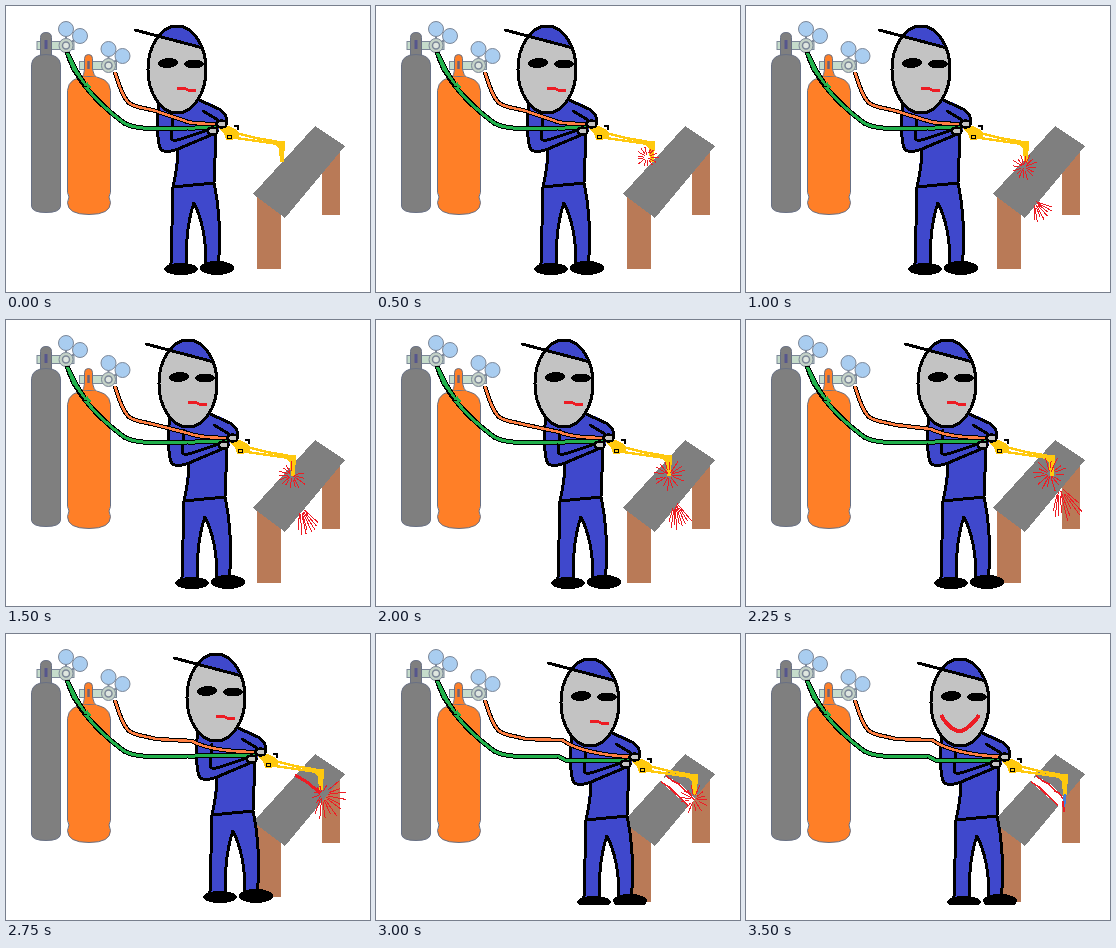
Animation of 364 by 286 pixels, one loop 4 s. Source, as an HTML page:

```html
<!DOCTYPE html>
<html lang="en">
<head>
<meta charset="utf-8">
<title>Gas cutting</title>
<style>
  html, body { margin: 0; width: 100%; height: 100%; overflow: hidden; background: #fff; }
  svg { display: block; width: 100vw; height: 100vh; }
  .ink { fill: none; stroke: #000; stroke-width: 3; stroke-linecap: round; stroke-linejoin: round; }
  .blue { fill: #3f48cc; }
  .skin { fill: #c3c3c3; stroke: #000; }
  .gold { fill: #ffc90e; }
  .steel { fill: #7f7f7f; }
  .wood { fill: #b97a57; }
  .red { fill: none; stroke: #ed1c24; }
  .hose { fill: none; stroke-linejoin: round; }
  .crisp { shape-rendering: crispEdges; }
</style>
</head>
<body>
<svg viewBox="0 0 364 286">
  <defs>
    <clipPath id="capClip"><path d="M125 15H205V44L197 42L129 24Z"/></clipPath>
    <clipPath id="floor"><path d="M0 0H364V271H0Z"/></clipPath>
    <g id="gauge" stroke="#7c8798">
      <rect x="-29" y="-4" width="37" height="8" fill="#c5dccb"/>
      <path d="M0 -7V-10M6 -4L10 -7" stroke-width="2"/>
      <circle cy="-16.5" r="7.5" fill="#a9cdf0"/>
      <circle cx="14" cy="-9.5" r="7.5" fill="#a9cdf0"/>
      <circle r="7" fill="#c5d3c8"/>
      <circle r="3.5" fill="#dfe6e0" stroke-width="1.500"/>
    </g>
  </defs>

  <use href="#gauge" x="60" y="39.500"/>
  <use href="#gauge" x="102.500" y="59.500"/>
  <g stroke="#687084" transform="translate(.5 .5)">
    <path class="steel" d="M34 51V31Q34 26 39.500 26Q45 26 45 31V51Z"/>
    <path class="steel" d="M25 58Q26 48 39.500 48Q53 48 54 58V200Q53 206 39.500 206Q26 206 25 200Z"/>
    <g fill="#ff7f27">
      <path d="M74 72Q78 69 78 63V52Q78 48 82 48Q86 48 86 52V63Q87 69 91 72Z"/>
      <path d="M61 84Q62 70 82.500 70Q103 70 104 84V186Q101 190 104 196Q104 208 82.500 208Q61 208 61 196Q64 190 61 186Z"/>
    </g>
    <path d="M74.500 72H90.500" stroke="#ff7f27" stroke-width="3"/>
  </g>
  <path d="M40 34V43" stroke="#56568c" stroke-width="3"/>
  <path d="M82.500 55V63" stroke="#6d6478" stroke-width="2.500"/>

  <g class="crisp">
    <g id="table"></g>
    <g clip-path="url(#floor)"><g id="man">
      <path class="blue" d="M167 181L164 259H180L181 230L188 197L198 225L200 258H212L214 215L208 177Z"/>
      <path class="blue" d="M155 94C150 110 151 128 153 138C154 146 161 147 171 143L167 181L208 177L210 126L221 118V109C215 101 205 97 193 93Z"/>
      <g class="ink">
        <path d="M154 94C150 110 151 128 153 138C154 147 161 147 172 143L205 129"/>
        <path d="M167 110L165 133Q168 136 178 132L205 123"/>
        <path d="M193 94L213 103Q221 108 221 116"/>
        <path d="M197 105L212 114"/>
        <path d="M172 144C172 158 169 172 167 181L208 177L210 128"/>
        <path d="M167 181C167 210 165 230 165 259M188 197C183 211 180 234 180 258"/>
        <path d="M188 197C197 215 200 235 200 257M208 177C212 195 216 233 212 257"/>
      </g>
      <ellipse cx="175" cy="263" rx="17" ry="6"/>
      <ellipse cx="211" cy="262" rx="17" ry="7"/>
      <ellipse class="skin" cx="171" cy="63.500" rx="29" ry="43.500"/>
      <ellipse class="blue" cx="171" cy="63.500" rx="29" ry="43.500" clip-path="url(#capClip)"/>
      <ellipse class="ink" cx="171" cy="63.500" rx="29" ry="43.500"/>
      <path class="ink" d="M129 24L197 42"/>
      <ellipse cx="162" cy="57" rx="10" ry="5" transform="rotate(-4 162 57)"/>
      <ellipse cx="188" cy="58" rx="10" ry="4.500"/>
      <path id="mouth" class="red"/>
    </g></g>
    <g id="hoses"></g>
    <g id="tool">
      <path class="gold" d="M212 122L223 120L229 123L233 126V133L220 134L218 127Z"/>
      <path d="M230 127L250 132L278 137M230 132L272 138" fill="none" stroke="#ffc90e" stroke-width="2.500"/>
      <path class="gold" d="M268 138L279 135L278 156H274L273 143Z"/>
      <path d="M228 120H232V124" fill="none" stroke="#000" stroke-width="1.500"/>
      <circle cx="223.500" cy="131" r="2" fill="#ffc90e" stroke="#000"/>
      <ellipse class="skin" cx="215.500" cy="118" rx="5" ry="3.500" stroke-width="2.500"/>
      <ellipse class="skin" cx="206.500" cy="125" rx="5" ry="3.500" stroke-width="2.500"/>
    </g>
    <g id="fire"></g>
  </g>
</svg>
<script>
const LOOP = 4000;
const get = id => document.getElementById(id);

// bursts: [x, y, radius, first angle, sweep, rays]
const poses = [
  { at: 0, dx: 0 },
  { at: 500, dx: 0, bursts: [[271, 151, 12, 0, 360, 14]] },
  { at: 1000, dx: 4, bursts: [[278, 161, 14, 0, 360, 16], [288, 195, 23, 18, 78, 8]] },
  { at: 1500, dx: 11, bursts: [[286, 155, 16, -10, 290, 14], [294, 186, 33, 42, 56, 8]] },
  { at: 2000, dx: 17, bursts: [[293, 155, 17, 0, 360, 16], [299, 181, 31, 50, 62, 9]] },
  { at: 2250, dx: 30, bursts: [[304, 154, 18, 0, 360, 16], [313, 166, 36, 40, 68, 10]] },
  { at: 2750, dx: 39, seam: true, bursts: [[316, 161, 26, -40, 165, 11], [316, 160, 11, 120, 200, 6]] },
  { at: 3000, dx: 43, dy: 5, split: true, bursts: [[318, 165, 16, 0, 360, 14]] },
  { at: 3500, dx: 43, dy: 5, split: true, done: true }
];

const random = seed => () => {
  seed = (seed * 16807) % 2147483647;
  return seed / 2147483647;
};

function burst([x, y, size, start, sweep, rays]) {
  const rnd = random(x * 31 + y);
  let d = "";
  for (let i = 0; i < rays; i++) {
    const a = (start + sweep * (i + rnd() * 0.5) / rays) * Math.PI / 180;
    const point = r => (x + r * Math.cos(a)).toFixed(1) + " " + (y + r * Math.sin(a)).toFixed(1);
    d += `M${point(size * (0.1 + 0.25 * rnd()))}L${point(size * (0.7 + 0.3 * rnd()))}`;
  }
  return `<path class="red" d="${d}"/>`;
}

function table(seam, split) {
  const foot = split ? 268 : 263;
  let art = `<path class="wood" d="M251 185H275V${foot}H251ZM316 145H334V209H316Z"/>` +
    '<path class="steel" d="M309 120L339 140L279 212L247 188Z"/>';
  if (seam) art += '<path class="red" stroke-width="3" d="M289 141L301 148L314 159"/>';
  if (split) art += '<path d="M284 147L291 142L304 150L319 165L313 173Z" fill="#fff"/>' +
    '<path class="red" stroke-width="1.500" d="M290 142L297 147L303 150L309 157L313 159L318 166M285 148L293 153L300 160L312 171"/>';
  return art;
}

function hose(d, color, width) {
  return `<path class="hose" d="${d}" stroke="#000" stroke-width="${width + 2}"/>` +
    `<path class="hose" d="${d}" stroke="${color}" stroke-width="${width}"/>`;
}

function hoses(dx, dy) {
  const green = `M61 46C68 70 86 93 118 117C130 124 150 123 182 122` +
    `L189 ${122 + dy * 0.8}L${211 + dx} ${121 + dy}`;
  const orange = `M109 66C113 80 117 91 123 97C130 102 140 102 150 105` +
    `L${182 + dx * 0.1} ${116 - dx * 0.23}Q${190 + dx * 0.4} ${118 + dy * 0.5} ${214 + dx} ${118 + dy}`;
  return hose(orange, "#ff7f42", 2.5) + hose(green, "#22b14c", 3) +
    '<path d="M59 46H63L72 64L82 80L78 80L66 64Z" fill="#22b14c" stroke="#000"/>' +
    '<path d="M80 77L84 82" stroke="#22b14c" stroke-width="3"/>';
}

function draw({ dx, dy = 0, seam, split, done, bursts = [] }) {
  const move = `translate(${dx} ${dy})`;
  get("man").setAttribute("transform", move);
  get("tool").setAttribute("transform", move);
  get("mouth").setAttribute("stroke-width", done ? 4 : 3);
  get("mouth").setAttribute("d", done
    ? "M152 76Q158 87 166 91Q172 94 178 89Q187 82 190 76"
    : "M171 83L178 82L182 84L190 84");
  get("table").innerHTML = table(seam, split);
  get("hoses").innerHTML = hoses(dx, dy);
  get("fire").innerHTML = bursts.map(burst).join("") + (done
    ? '<path d="M319 160L318 174" stroke="#3f7fe0" stroke-width="2.500"/>' +
      '<path class="red" stroke-width="2" d="M317 167L318 178"/>'
    : "");
}

let shown;
const begin = performance.now();
function tick(now) {
  const t = Math.max(0, now - begin) % LOOP;
  const pose = poses.filter(p => p.at <= t).pop();
  if (pose !== shown) draw(shown = pose);
  requestAnimationFrame(tick);
}
tick(begin);
</script>
</body>
</html>
```
